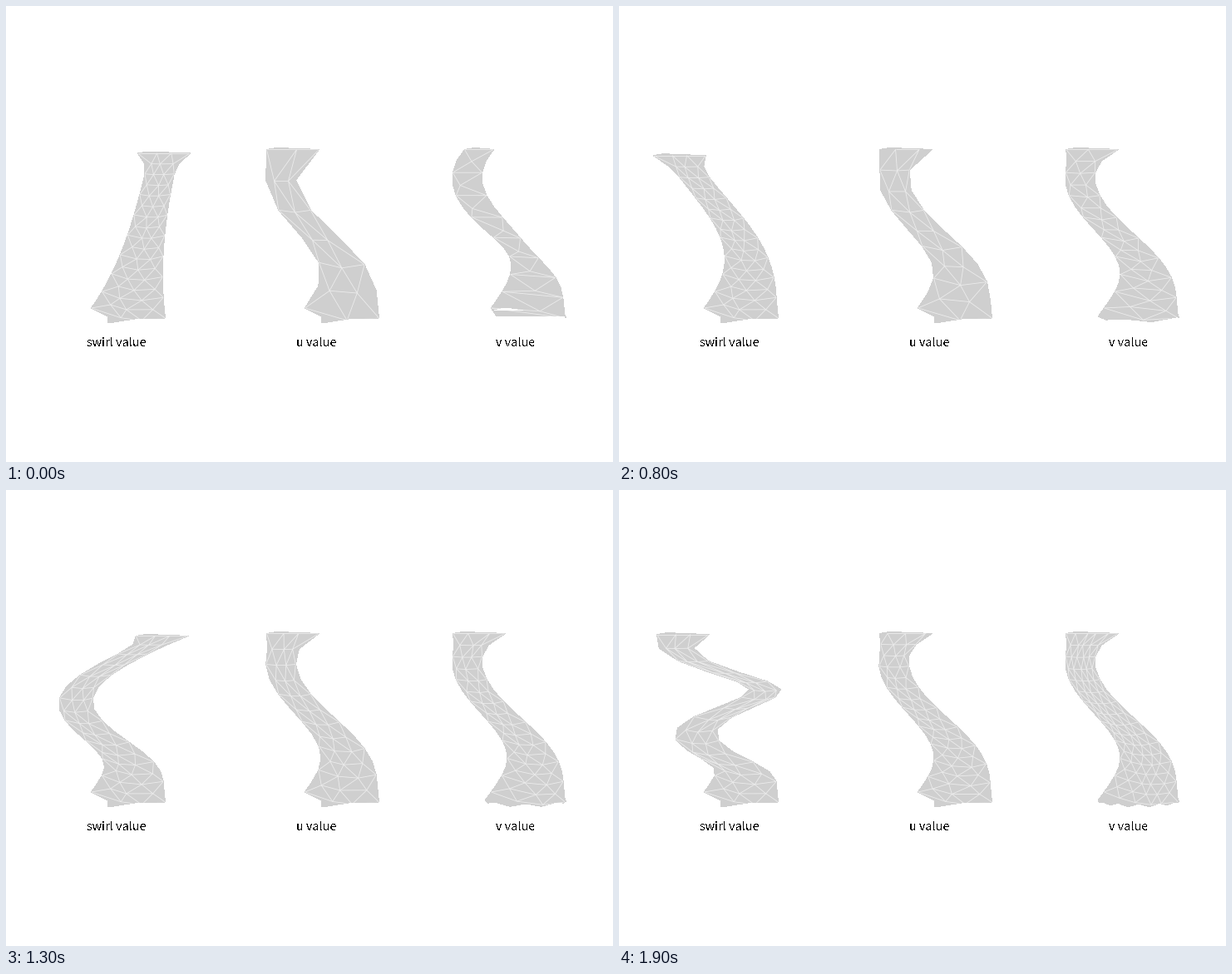
These frames come from a looping animation (730 px wide and 548 px high, 2400 ms). A matplotlib script:

```python
import numpy as np
import matplotlib.pyplot as plt
from matplotlib.animation import FuncAnimation
from matplotlib.collections import LineCollection
from matplotlib.patches import Polygon

W, H, DPI = 730, 548, 100
LAST = 15           # steps in the sweep
BEND = 6            # twist shared by the two columns that do not swirl
TURN = 38.3         # degrees of twist added per step
FILL, EDGE = "#cfcfcf", "#ececec"

fig = plt.figure(figsize=(W / DPI, H / DPI), dpi=DPI, facecolor="white")
ax = fig.add_axes([0, 0, 1, 1])
ax.set_xlim(0, W)
ax.set_ylim(H, 0)
ax.axis("off")


def surface(h, v, twist, pinch=0.0, flare=1.0):
    """Point at height h (0 foot, 1 top) and v (0 left edge, 1 right edge)."""
    phase = np.radians(TURN * twist * np.clip((h - 0.12) / 0.88, 0, 1))
    centre = 128 + (19 + 43 * h) * np.cos(phase)
    half = 17.5 + 27 * (1 - h) ** 2.5
    half = half * (1 - pinch * np.exp(-((h - 0.42) / 0.16) ** 2))
    half = half + 14 * flare * np.clip((h - 0.88) / 0.12, 0, 1) ** 2
    x = centre + half * (2 * v - 1)
    y = 375 - 198 * h + 6 * h * np.sin(phase) - 12 * (1 - v) * (1 - h) ** 4
    return np.stack(np.broadcast_arrays(x, y), -1)


def corner_foot(step):
    return np.array([(122, 373), (123, 381), (155, 376)], float)


def toothed_foot(step):
    """Half ellipse whose teeth grow in number with the ribs."""
    k = np.arange(int(round(2 + 0.65 * step)) + 1)
    a = np.pi * k / k[-1]
    grow = 1 - np.exp(-step / 2)
    x = 193 - (49 - 7 * np.exp(-step)) * (1 + np.cos(a))
    y = 373 + grow * np.sin(a) * (4 + 4 * (k % 2))
    return np.column_stack([x, y])


class Column:
    def __init__(self, dx, rows, cols, twist, foot, shape=lambda step: {}, seed=1):
        self.dx, self.rows, self.cols = dx, rows, cols
        self.twist, self.foot, self.shape = twist, foot, shape
        self.jitter = np.random.default_rng(seed).uniform(-1, 1, (20, 20))
        self.body = ax.add_patch(Polygon([(0, 0), (1, 0), (1, 1)], fc=FILL,
                                         ec="none", lw=0, antialiased=False))
        self.mesh = ax.add_collection(
            LineCollection([], colors=EDGE, linewidths=0.6))

    def draw(self, step):
        rows, cols = int(round(self.rows(step))), int(round(self.cols(step)))
        h = np.linspace(0, 1, rows + 1)
        twist, shape = self.twist(step), self.shape(step)
        left = surface(h, 0, twist, **shape)
        right = surface(h, 1, twist, **shape)
        lip = left[-1] + (12, -2)
        outline = np.vstack([left[:1], self.foot(step), right, [lip], left[::-1]])
        self.body.set_xy(outline + (self.dx, 0))

        # Triangles: level lines joined by zigzags
        v = np.linspace(0, 1, 2 * cols + 1)
        inner = np.sin(np.pi * v)
        w = v + 0.25 / cols * inner * self.jitter[:rows + 1, :v.size]
        grid = left[:, None] * (1 - w[..., None]) + right[:, None] * w[..., None]
        grid[..., 1] += 8 * (1 - h[:, None]) * inner
        grid[..., 0] += self.dx
        odd = np.arange(v.size) % 2
        lines = [row[i % 2::2] for i, row in enumerate(grid)]
        for i in range(rows):
            lines.append(grid[i + (odd ^ (i % 2)), np.arange(v.size)])
        self.mesh.set_segments(lines)
        self.mesh.set_clip_path(self.body)


columns = [
    Column(0, lambda s: 16, lambda s: 3, lambda s: s, corner_foot, seed=4),
    Column(257, lambda s: 6 + 0.72 * s, lambda s: 2 + s / LAST,
           lambda s: BEND, corner_foot, seed=7),
    Column(481, lambda s: 16, lambda s: 1 + 0.27 * s, lambda s: BEND, toothed_foot,
           lambda s: dict(pinch=0.36 * np.exp(-s), flare=1 - np.exp(-s)), seed=9),
]
gap = ax.add_patch(Polygon([(0, 0), (1, 0), (1, 1)], fc="white", ec="none",
                           lw=0, antialiased=False, zorder=3))

for x, name in ((132.5, "swirl value"), (373, "u value"), (613, "v value")):
    ax.text(x, 409, name, family="Noto Sans CJK JP", size=14.3 * 72 / DPI,
            ha="center", va="baseline", color="black", antialiased=False)


def update(frame):
    step = min(max(frame - 4, 0), LAST)
    for column in columns:
        column.draw(step)
    # The coarsest ribs leave a slit open near the foot
    gap.set_visible(step < 2)
    gap.set_xy([(587 + 5 * step, 366 + 8 * step), (600 + 12 * step, 363),
                (622 + 12 * step, 366)])
    return []


anim = FuncAnimation(fig, update, frames=24, interval=100, repeat=True,
                     repeat_delay=0, blit=False)
plt.show()
```
